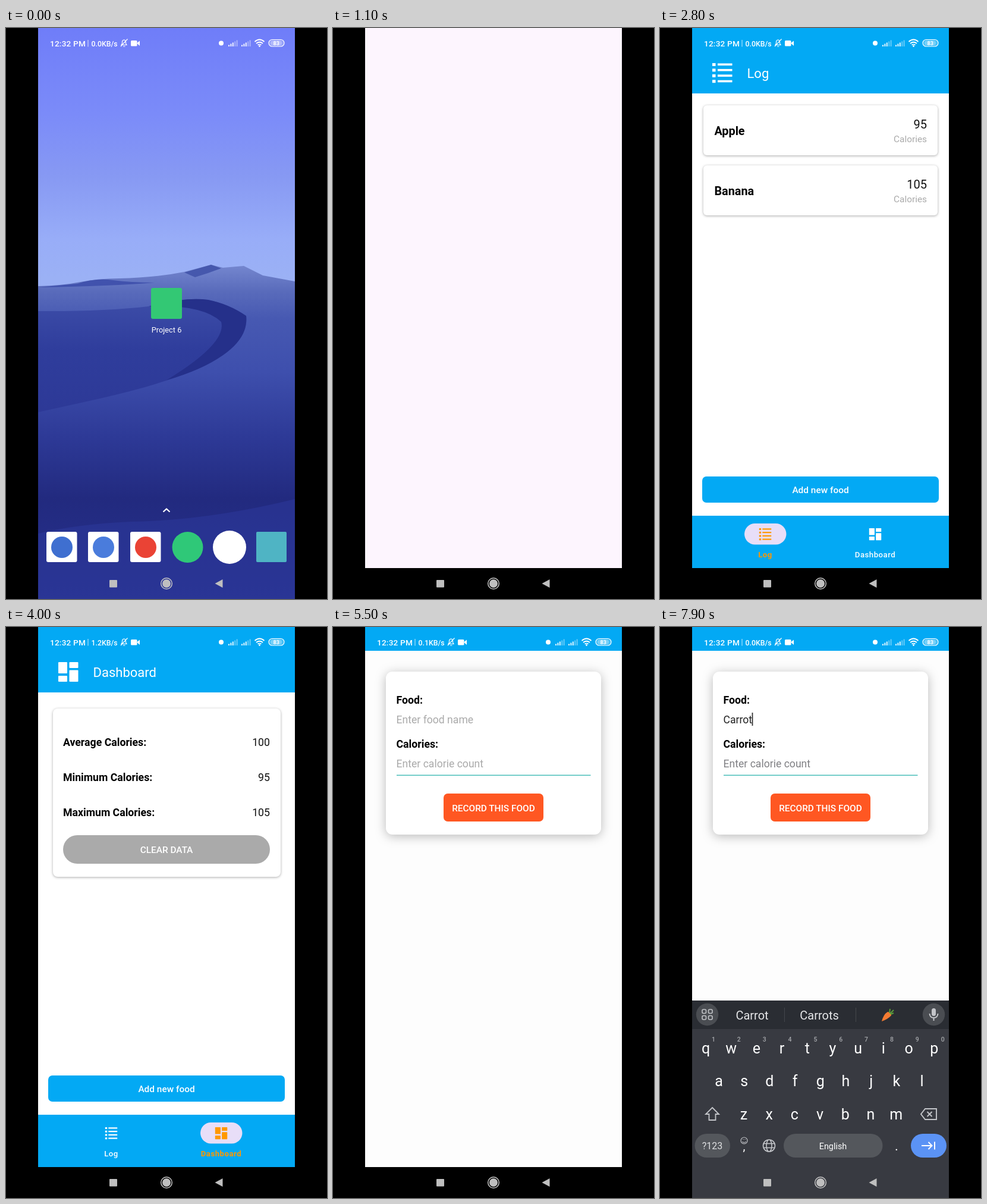
Animation, 540 px wide and 960 px high, one loop 8000 ms. Source, as an HTML page:

```html
<!DOCTYPE html>
<html lang="en">
<head>
<meta charset="utf-8">
<title>Food log</title>
<style>
html, body { margin: 0; width: 100%; height: 100%; overflow: hidden; background: #000; }
svg { display: block; width: 540px; height: 960px; font-family: Roboto, Arial, sans-serif; }
.card { fill: #fff; filter: drop-shadow(0 1px 2px #0005); }
.lift { fill: #fff; filter: drop-shadow(0 3px 9px #0004); }
</style>
</head>
<body>
<svg id="root" viewBox="0 0 540 960"></svg>
<script>
const BLUE = '#03a9f4', ORANGE = '#ff9800', PILL = '#e8def8';

const rect = (x, y, w, h, fill, r = 0, more = '') =>
  `<rect x="${x}" y="${y}" width="${w}" height="${h}" fill="${fill}" rx="${r}" ${more}/>`;
const circle = (x, y, r, fill, more = '') => `<circle cx="${x}" cy="${y}" r="${r}" fill="${fill}" ${more}/>`;
const path = (d, fill, more = '') => `<path d="${d}" fill="${fill}" ${more}/>`;
const line = (d, color, width, more = '') =>
  path(d, 'none', `stroke="${color}" stroke-width="${width}" ${more}`);
const text = (s, x, y, size, fill, weight = 400, anchor = 'start', more = '') =>
  `<text x="${x}" y="${y}" font-size="${size}" fill="${fill}" font-weight="${weight}" text-anchor="${anchor}" ${more}>${s}</text>`;
const group = (id, body, more = '') => `<g id="${id}" ${more}>${body}</g>`;
const at = (x, y, k, body) => `<g transform="translate(${x} ${y}) scale(${k})">${body}</g>`;
const grad = (id, ...stops) => `<linearGradient id="${id}" x2="0" y2="1">` +
  stops.map(([p, c]) => `<stop offset="${p}" stop-color="${c}"/>`).join('') + '</linearGradient>';

const listIcon = c => [0, 9.4, 18.8, 28.2].map(y =>
  rect(0, y, 5.5, 5, c) + rect(9, y + .5, 24.5, 3.6, c)).join('');
const boardIcon = c => rect(0, 0, 15, 19, c, 1) + rect(0, 23, 15, 10, c, 1) +
  rect(18.5, 0, 15, 10, c, 1) + rect(18.5, 13.5, 15, 19.5, c, 1);

// Home screen
const wallpaper = rect(54, 0, 432, 960, 'url(#sky)') +
  path('M54 434Q95 433 125 427T190 421Q250 420 300 410L345 398 365 403 400 400 432 416 486 426V960H54Z', 'url(#far)') +
  path('M300 411L345 398 362 404 340 412 318 419Z', '#4658ad') +
  path('M120 430Q150 420 180 424T250 428Q180 434 54 436Z', '#4152ad') +
  path('M54 476Q160 477 240 468Q300 452 340 457Q375 464 404 484Q408 520 365 550C290 598 170 620 54 646Z', 'url(#dune)') +
  path('M240 468Q300 452 340 457Q375 464 404 484Q408 520 365 550Q330 575 270 592Q372 530 362 494Q330 464 240 468Z', '#25308a') +
  path('M210 830Q340 828 486 792V960H54V850Q120 834 210 830Z', '#2c379a', 'opacity=".6"');
const dock = [[94, '#3f6fd0'], [164, '#4a7cdc'], [235, '#ea4335']].map(([x, c]) =>
  rect(x - 26, 847, 51.5, 51, '#fff', 3) + circle(x, 873, 18, c)).join('') +
  circle(305.5, 873, 26, '#2fc878') + circle(376, 873, 28, '#fff') + rect(421, 847, 51, 51, '#4fb4c4', 2);
const home = wallpaper + rect(244, 437, 52, 52, '#33c874', 3) +
  text('Project 6', 270, 512, 12.8, '#fff', 400, 'middle') +
  line('M264.500 813.500L270 808.500 275.500 813.500', '#fff', 2.2) + dock;

// Log and dashboard pages
const food = (name, count, y) => rect(73, y, 394, 84, '#fff', 6, 'class="card"') +
  text(name, 91.5, y + 50, 19.8, '#000', 700) +
  text(count, 449, y + 39, 20, '#111', 400, 'end') +
  text('Calories', 449, y + 62, 15.4, '#aaa', 400, 'end');
const stat = (name, value, y) => text(name + ' Calories:', 96, y, 17.7, '#000', 700) +
  text(value, 444, y, 17.7, '#111', 400, 'end');
const tab = (name, x, icon, on) =>
  (on ? rect(x - 35, 833, 70.5, 35.5, PILL, 17.7, `class="pill" data-x="${x}"`) : '') +
  at(x - 10.2, 841, .61, icon(on ? ORANGE : '#fff')) +
  text(name, x, 890, 13.2, on ? ORANGE : '#fff', on ? 700 : 500, 'middle', 'letter-spacing=".5"');
const page = (name, icon, body, board) => at(88, 59, 1, icon('#fff')) +
  text(name, 146.5, 84, 22, '#fff') + body +
  tab('Log', 177, listIcon, !board) + tab('Dashboard', 362, boardIcon, board);

const mainPage = rect(54, 0, 432, 908, '#fff') + rect(54, 0, 432, 110, BLUE) +
  rect(54, 820, 432, 88, BLUE) + rect(71, 754, 398, 44, BLUE, 7) +
  text('Add new food', 270, 782, 15.4, '#fff', 500, 'middle') +
  group('log', page('Log', listIcon, food('Apple', 95, 130) + food('Banana', 105, 231), false)) +
  group('board', page('Dashboard', boardIcon,
    rect(79, 137, 383, 283, '#fff', 8, 'class="card"') +
    stat('Average', 100, 200) + stat('Minimum', 95, 259) + stat('Maximum', 105, 318) +
    rect(96, 350, 348, 48, '#aaa', 24) +
    text('CLEAR DATA', 270, 380, 15.4, '#fff', 500, 'middle'), true)) +
  rect(54, 0, 432, 908, '#000', 0, 'id="dim" opacity="0"');

// Entry form
const form = rect(54, 0, 432, 908, '#fdfdfd') + rect(54, 0, 432, 40, BLUE) +
  rect(89, 75, 362, 274, '#fff', 11, 'class="lift"') +
  text('Food:', 106.500, 129, 17.7, '#000', 700) +
  text('Calories:', 106.500, 203, 17.7, '#000', 700) +
  text('', 106.500, 161.500, 17.6, '#aaa', 400, 'start', 'id="entry"') +
  rect(107, 144, 1.8, 22, '#333', 0, 'id="caret"') +
  text('Enter calorie count', 106.500, 235.500, 17.6, '#aaa', 400, 'start', 'id="hint"') +
  rect(107, 248.600, 326.500, 1.300, '#31b5b0') +
  rect(186, 280, 168, 47, '#ff5722', 7) +
  text('RECORD THIS FOOD', 270, 309.500, 15.4, '#fff', 500, 'middle');

// Keyboard
const GREY = '#c3c5c9', DARK = '#2a2d33', KEY = '#54575c';
const keys = (letters, x, y) => [...letters].map((c, i) =>
  text(c, x + 42.7 * i, y, 25, '#fff', 400, 'middle')).join('');
const letters = f => keys(f('QWERTYUIOP'), 77, 717) + keys(f('ASDFGHJKL'), 99, 772) + keys(f('ZXCVBNM'), 141, 827.500);
const SHIFT = 'M88 808L99 819H93.500V829H82.500V819H77Z';
const tools = text('GIF', 143, 657, 15, '#5d6066', 700, 'middle') +
  line('M200 642H213Q216 642 216 645V654L209 661H200Q197 661 197 658V645Q197 642 200 642ZM201 652Q206 659 212 652M202 648H204M209 648H211', '#5d6066', 2) +
  line('M262 644H277V661H262ZM265.500 650H273.500M265.500 654H273.500M265.500 658H271', GREY, 2) + rect(266, 641, 7, 5, GREY, 1) +
  circle(333, 651.500, 5.5, 'none', `stroke="${GREY}" stroke-width="4.500"`) +
  circle(333, 651.500, 8.5, 'none', `stroke="${GREY}" stroke-width="3" stroke-dasharray="4.500 4.400"`) +
  at(384.500, 639.500, 1, path('M12 3a9 9 0 0 0 0 18c.83 0 1.500-.67 1.500-1.500 0-.39-.15-.74-.39-1.010-.23-.26-.38-.61-.38-.99 0-.83.67-1.500 1.500-1.500H16c2.760 0 5-2.240 5-5 0-4.420-4.030-8-9-8z', GREY) +
    [[6.500, 11], [9.500, 7], [14.500, 7], [17.500, 11]].map(([x, y]) => circle(x, y, 1.5, DARK)).join(''));
const words = [155, 268].map((x, i) => text('', x, 660, 20, '#e6e7e9', 400, 'middle', `id="word${i}"`)).join('') +
  rect(209, 640, 1, 24, '#44474c') + rect(329, 640, 1, 24, '#44474c') +
  group('carrot', path('M373 663Q376 651 383 647Q390 648 389 653Q384 659 373 663Z', '#f47b32') +
    line('M386 649L387 642M387 650L393 644M388 651L393 649', '#5b9c3a', 2));
const keyboard = rect(54, 628, 432, 332, '#383a41') + rect(54, 628, 432, 48, DARK) +
  circle(79.500, 651.500, 18.7, '#4a4d52') + circle(460.500, 651.500, 18.7, '#4a4d52') +
  [[71, 643], [81.500, 643], [71, 653.500], [81.500, 653.500]].map(([x, y]) =>
    rect(x, y, 6.5, 6.5, 'none', 2, `stroke="${GREY}" stroke-width="1.600"`)).join('') +
  rect(457, 641, 7, 13, GREY, 3.5) + line('M453.500 650Q454 657 460.500 657T467.500 650M460.500 657V662', GREY, 2) +
  group('tools', tools) + group('words', words) +
  [...'1234567890'].map((n, i) => text(n, 90 + 42.85 * i, 697, 10.5, '#a5a7ab', 500, 'middle')).join('') +
  group('upper', letters(s => s) + path(SHIFT, '#fff')) +
  group('lower', letters(s => s.toLowerCase()) + line(SHIFT, GREY, 1.8)) +
  line('M446 810H465V828H446L439 819ZM449.500 815L457.500 823M457.500 815L449.500 823', GREY, 1.9) +
  rect(58.500, 852, 59.500, 40, KEY, 20) + text('?123', 88, 878, 16, '#dedfe1', 400, 'middle') +
  circle(141.500, 863.500, 5.5, 'none', `stroke="${GREY}" stroke-width="1.200"`) +
  line('M138.500 865Q141.500 869 144.500 865M139.300 861.500H140.500M142.500 861.500H143.700', GREY, 1.2) +
  text(',', 141.500, 880, 20, '#fff', 400, 'middle') +
  line('M173.500 872a10 10 0 0 0 20 0a10 10 0 0 0-20 0ZM179 872a4.500 10 0 0 0 9 0a4.500 10 0 0 0-9 0ZM175 868.500H192M175 875.500H192', GREY, 1.6) +
  rect(208, 852, 166.500, 40, KEY, 20) + text('English', 291, 878, 14.4, '#fff', 400, 'middle') +
  text('.', 398, 880, 22, '#fff', 400, 'middle') + rect(422, 852, 60, 40, '#5b93f5', 20) +
  line('M440 872H457M451.500 866L457.500 872 451.500 878M462 865.500V878.500', '#fff', 2);

// System bars
const bars = (x, on) => [0, 1, 2, 3, 4].map(i =>
  rect(x + i * 3.4, 28.500 - i * 2, 2, 2.5 + i * 2, '#fff', 0, `opacity="${i < on ? .9 : .4}"`)).join('');
const status = text('12:32 PM', 74, 30.500, 13.6, '#fff', 500, 'start', 'letter-spacing=".2"') +
  rect(137.500, 20, 1, 11.500, '#fff', 0, 'opacity=".8"') +
  text('', 143.500, 30.500, 12.3, '#fff', 500, 'start', 'id="speed"') +
  line('M194 28.500H203L201.500 26V23Q201 20 198.500 20T195.500 23V26ZM197 31H200.500M193 31L204.500 18.500', '#fff', 1.2) +
  rect(210, 21, 10.500, 9.500, '#fff', 1.5) + path('M220 25.500L225 21.500V30Z', '#fff') +
  circle(362, 25.500, 4, '#fff') + bars(374, 3) + bars(396, 3) +
  line('M418.500 23Q426.500 16 434.500 23M421 26Q426.500 21.500 432 26M423.500 28.500Q426.500 26.500 429.500 28.500', '#fff', 1.7) +
  circle(426.500, 30.500, 1.4, '#fff') +
  rect(442, 19.500, 26, 11.500, '#fff4', 5.7, 'stroke="#fff" stroke-width="1.200"') +
  rect(445, 21.500, 19, 7.500, '#fff4', 3.5) +
  text(83, 454.700, 28.600, 9, '#fff', 700, 'middle');
const nav = rect(174, 928, 13, 12.500, '#bfbfbf', 1) +
  circle(270, 934, 9.3, 'none', 'stroke="#c4c4c4" stroke-width="1.500"') + circle(270, 934, 7, '#bfbfbf') +
  path('M351.500 934L364.500 927V941Z', '#bfbfbf');

const $ = id => document.getElementById(id);
$('root').innerHTML = '<defs>' +
  grad('sky', [0, '#6f7df9'], [.15, '#7b8bf9'], [.26, '#8799f3'], [.37, '#98adf8'], [.44, '#9bb1f5']) +
  grad('far', [0, '#7587cf'], [.08, '#596bbb'], [.16, '#4759b2'], [.32, '#3e4fad'], [.52, '#2d3996'], [.7, '#222a7f'], [1, '#27318f']) +
  grad('dune', [0, '#3d4da8'], [.45, '#2f3d9c'], [1, '#2d3997']) +
  '<clipPath id="screen"><rect x="54" width="432" height="960"/></clipPath></defs>' +
  rect(0, 0, 540, 960, '#000') +
  group('phone', group('home', home) + rect(0, 0, 0, 0, '#fdf5fe', 0, 'id="splash"') +
    rect(54, 908, 432, 52, '#000', 0, 'id="navBack"') + group('main', mainPage) +
    group('form', form) + group('keyboard', keyboard) + group('status', status), 'clip-path="url(#screen)"') + nav;

const OPEN = 600, MAIN = 1500, BOARD = 3300, FORM = 4850, FOCUS = 5800;
const TYPED = [6900, 7080, 7260, 7430, 7600, 7750];
const GUESSES = ['Can', 'Can', 'Carrot', 'Carrot', 'Carrot', 'Carrots'];
const ease = (t, start, span) => 1 - (1 - Math.min(1, Math.max(0, (t - start) / span))) ** 3;
const show = (id, on) => $(id).setAttribute('display', on ? 'inline' : 'none');
const set = (node, attrs) => Object.entries(attrs).forEach(([k, v]) => node.setAttribute(k, v));
const pills = [...document.querySelectorAll('.pill')];

function draw(t) {
  const opened = t >= OPEN + 380;
  show('home', !opened);
  show('navBack', opened);
  show('splash', t >= OPEN && t < MAIN);
  show('status', !(t >= OPEN + 200 && t < MAIN));
  const p = ease(t, OPEN, 380), mix = (a, b) => a + (b - a) * p;
  set($('splash'), { x: mix(244, 54), y: mix(437, 0), width: mix(52, 432), height: mix(52, 960),
    rx: 24 * (1 - p), opacity: Math.min(1, (t - OPEN) / 120) });

  show('main', t >= MAIN && t < FORM + 350);
  show('log', t < BOARD);
  show('board', t >= BOARD);
  const grow = .4 + .6 * ease(t, BOARD, 300);
  pills.forEach((pill, i) => {
    const w = 70.5 * (i ? grow : 1);
    set(pill, { x: pill.dataset.x - w / 2 + .25, width: w });
  });

  const slide = ease(t, FORM, 350);
  set($('main'), { transform: `translate(${-108 * slide} 0)` });
  set($('dim'), { opacity: .4 * slide });
  show('form', t >= FORM);
  set($('form'), { transform: `translate(${432 * (1 - slide)} 0)` });

  const n = TYPED.filter(x => t >= x).length, typed = 'Carrot'.slice(0, n);
  $('entry').textContent = typed || 'Enter food name';
  set($('entry'), { fill: n ? '#222' : '#aaa' });
  set($('hint'), { fill: n ? '#808084' : '#aaa' });
  show('caret', t >= FOCUS && (n || (t - FOCUS) % 1000 < 500));
  if (t >= FORM) set($('caret'), { x: 106.5 + (n ? $('entry').getComputedTextLength() - .5 : 0) });

  show('keyboard', t >= FOCUS);
  set($('keyboard'), { transform: `translate(0 ${332 * (1 - ease(t, FOCUS + 50, 250))})` });
  show('upper', !n);
  show('lower', n);
  show('tools', !n);
  show('words', n);
  show('carrot', n > 5);
  $('word0').textContent = typed;
  $('word1').textContent = GUESSES[n - 1] || '';

  $('speed').textContent = (t < 3600 ? '0.0' : t < 4700 ? '1.2' : t < 7300 ? '0.1' : '0.0') + 'KB/s';
}

function tick() {
  draw(performance.now() % 8000);
  requestAnimationFrame(tick);
}
tick();
</script>
</body>
</html>
```
